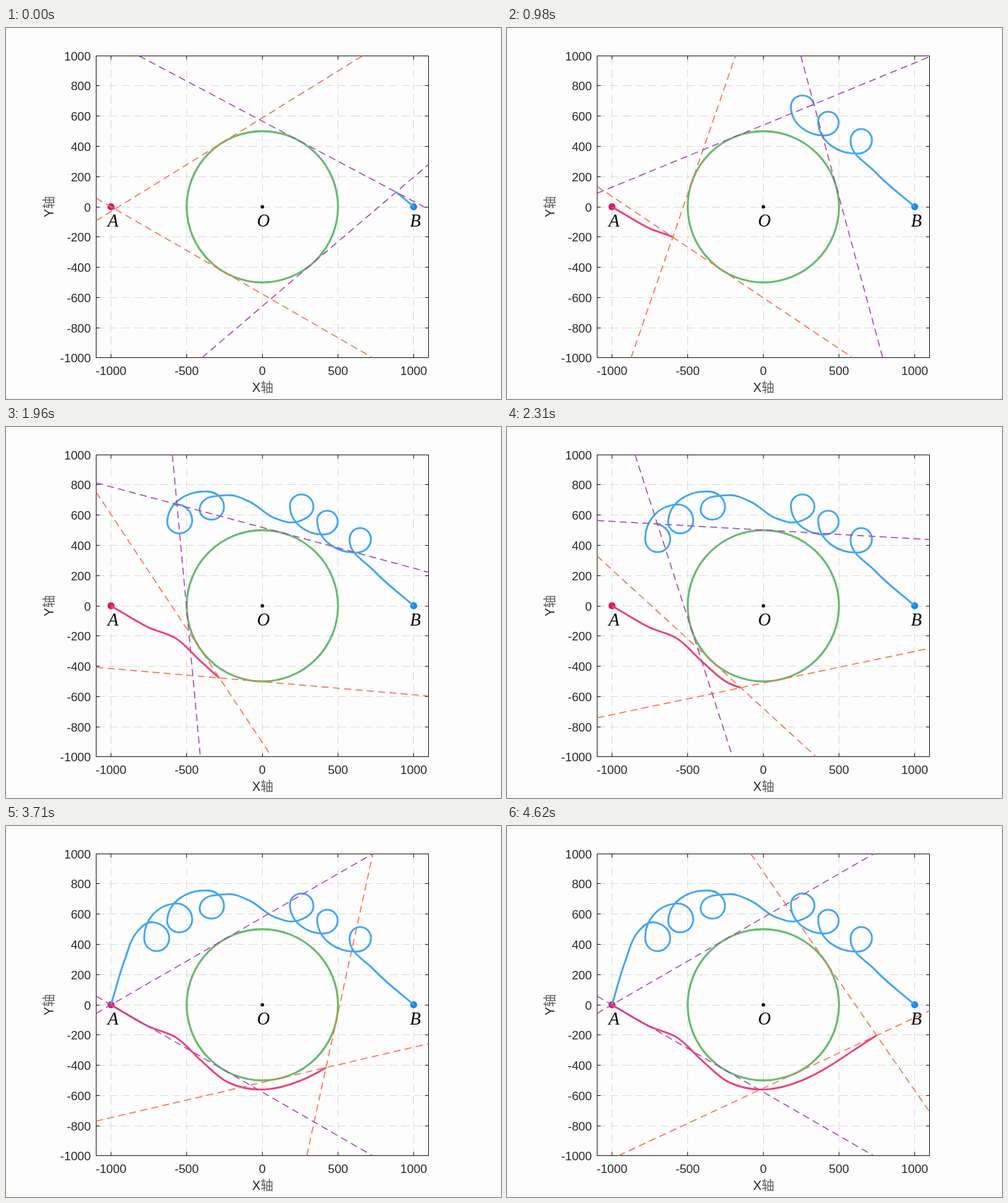
Write an HTML page that moves like this. It is 700x525 px and loops after 4690 ms.

```html
<!DOCTYPE html>
<html>
<head>
<meta charset="utf-8">
<style>
html, body { margin: 0; height: 100%; overflow: hidden; background: #fdfdfd; }
svg { display: block; width: 700px; height: 525px; }
text { font: 17px "Liberation Sans", "Noto Sans CJK SC", "Noto Sans CJK", sans-serif; fill: #262626; text-anchor: middle; }
.y { text-anchor: end; }
.title { font-size: 18px; }
.title tspan { fill: #5c5c5c; font-weight: 300; }
.math { font: italic 25px "Liberation Serif", serif; fill: #000; }
path, line { fill: none; }
.axis { stroke: #262626; }
.grid { stroke: #dcdcdc; stroke-dasharray: 12 6; }
.tangent { stroke-width: 1.5; stroke-dasharray: 10 6; }
.trail { stroke-width: 2.6; stroke-linejoin: round; }
</style>
</head>
<body>
<svg id="stage" viewBox="0 0 700 525"></svg>
<script>
const FRAME = 70, LOOP = 4690;
const SCALE = 0.214, CX = 362.5, CY = 253, R = 500 * SCALE;
const BOX = { l: 127.5, r: 597.5, t: 39.5, b: 466.5 };
const A = [CX - 1000 * SCALE, CY], B = [CX + 1000 * SCALE, CY];
const stage = document.getElementById('stage');

function set(el, attrs) {
  for (const key in attrs) el.setAttribute(key, attrs[key]);
}
function add(tag, attrs, html = '') {
  const el = document.createElementNS('http://www.w3.org/2000/svg', tag);
  set(el, attrs);
  el.innerHTML = html;
  return stage.appendChild(el);
}
const label = (x, y, html, cls = '') => add('text', { x, y, class: cls }, html);
const dot = (cx, cy, r, fill) => add('circle', { cx, cy, r, fill });
const crisp = v => Math.floor(v) + 0.5;

function drawAxes() {
  let axis = `M${BOX.l} ${BOX.t}H${BOX.r}V${BOX.b}H${BOX.l}Z`;
  for (let v = -1000; v <= 1000; v += 500) {
    const x = crisp(CX + v * SCALE);
    add('path', { class: 'grid', d: `M${x} ${BOX.b}V${BOX.t}` });
    axis += `M${x} ${BOX.b}v-5M${x} ${BOX.t}v5`;
    label(x, 491, v);
  }
  for (let v = -1000; v <= 1000; v += 200) {
    const y = Math.min(BOX.b, crisp(CY - v * SCALE));
    add('path', { class: 'grid', d: `M${BOX.l} ${y}H${BOX.r}` });
    axis += `M${BOX.l} ${y}h5M${BOX.r} ${y}h-5`;
    label(120, y + 6, v, 'y');
  }
  add('path', { class: 'axis', d: axis });
  label(363, 515, 'X<tspan>轴</tspan>', 'title');
  set(label(0, 0, 'Y<tspan>轴</tspan>', 'title'), { transform: 'translate(67 253) rotate(-90)' });
}

// One widening turn that starts at the left side; dir 1 is clockwise, -1 the other way
const spin = (x, y, r, dir) => [0, 1, 2, 3].map(i => {
  const angle = Math.PI + dir * i * 1.64, reach = r * (1 + 0.0053 * i ** 4);
  return [x + reach * Math.cos(angle), y + reach * Math.sin(angle)];
});

// Smooth curve; each tangent bisects the neighbouring chords, handles follow circular arcs
function curve(pts) {
  const unit = (p, q) => {
    const x = q[0] - p[0], y = q[1] - p[1], n = Math.hypot(x, y) || 1;
    return [x / n, y / n];
  };
  const dirs = pts.map((p, i) => {
    const a = unit(pts[i - 1] || p, p), b = unit(p, pts[i + 1] || p);
    return unit([0, 0], [a[0] + b[0], a[1] + b[1]]);
  });
  return pts.slice(1).reduce((d, q, i) => {
    const p = pts[i], c = unit(p, q), len = Math.hypot(q[0] - p[0], q[1] - p[1]);
    const handle = u => 2 * len / (3 * (1 + u[0] * c[0] + u[1] * c[1]));
    const u = dirs[i], v = dirs[i + 1], h = handle(u), k = handle(v);
    return d + `C${p[0] + u[0] * h} ${p[1] + u[1] * h} ${q[0] - v[0] * k} ${q[1] - v[1] * k} ${q}`;
  }, 'M' + pts[0]);
}

// Tangent from a point to the circle, cut at the plot box
function tangentLine({ x, y }, side) {
  const dx = CX - x, dy = CY - y;
  const angle = Math.atan2(dy, dx) + side * Math.asin(Math.min(1, R / Math.hypot(dx, dy)));
  const flip = Math.cos(angle) < 0 ? -1 : 1;
  const ux = flip * Math.cos(angle), uy = flip * Math.sin(angle);
  const v = [(BOX.t - y) / uy, (BOX.b - y) / uy].sort((a, b) => a - b);
  const from = Math.max((BOX.l - x) / ux, v[0]), to = Math.min((BOX.r - x) / ux, v[1]);
  return { x1: x + ux * from, y1: y + uy * from, x2: x + ux * to, y2: y + uy * to };
}

// A trail covered at constant speed in the given number of steps
function makeTraveller(color, tangentColor, steps, points) {
  const path = add('path', { class: 'trail', stroke: color, d: curve(points) });
  const total = path.getTotalLength();
  const lines = [1, -1].map(() => add('line', { class: 'tangent', stroke: tangentColor }));
  return step => {
    const length = total * Math.min(1, step / steps);
    set(path, { 'stroke-dasharray': `${length} 9999` });
    const tip = path.getPointAtLength(length);
    lines.forEach((line, i) => set(line, tangentLine(tip, 1 - 2 * i)));
  };
}

drawAxes();
add('circle', { cx: CX, cy: CY, r: R, fill: 'none', stroke: '#66bb6a', 'stroke-width': 2.8 });
dot(...A, 5, '#d81b60');
dot(...B, 5, '#1e88e5');
dot(CX, CY, 2.5, '#000');
label(151.5, 281, 'A', 'math');
label(364, 281, 'O', 'math');
label(579, 281, 'B', 'math');

const travellers = [
  makeTraveller('#ec407a', '#ff7043', 67, [
    A, [201, 283.4], [240, 299], [277, 333], [314.5, 363], [CX, 373], [416, 360.5], [522.7, 296.4]
  ]),
  makeTraveller('#42a5f5', '#ab47bc', 38.4, [
    B, [521, 204],
    ...spin(500.5, 157.5, 14.5, 1), ...spin(454, 132.5, 14, 1), ...spin(417.5, 111.5, 16, 1),
    [380, 129], [345, 106], [313, 96.5],
    ...spin(290.5, 114.5, 16.5, -1), ...spin(245, 133.5, 17, -1), ...spin(212.5, 160, 17, -1),
    [186, 149], [168, 189], A
  ])
];

function render() {
  const step = Math.floor(performance.now() % LOOP / FRAME) + 1;
  for (const move of travellers) move(step);
  requestAnimationFrame(render);
}
render();
</script>
</body>
</html>
```
